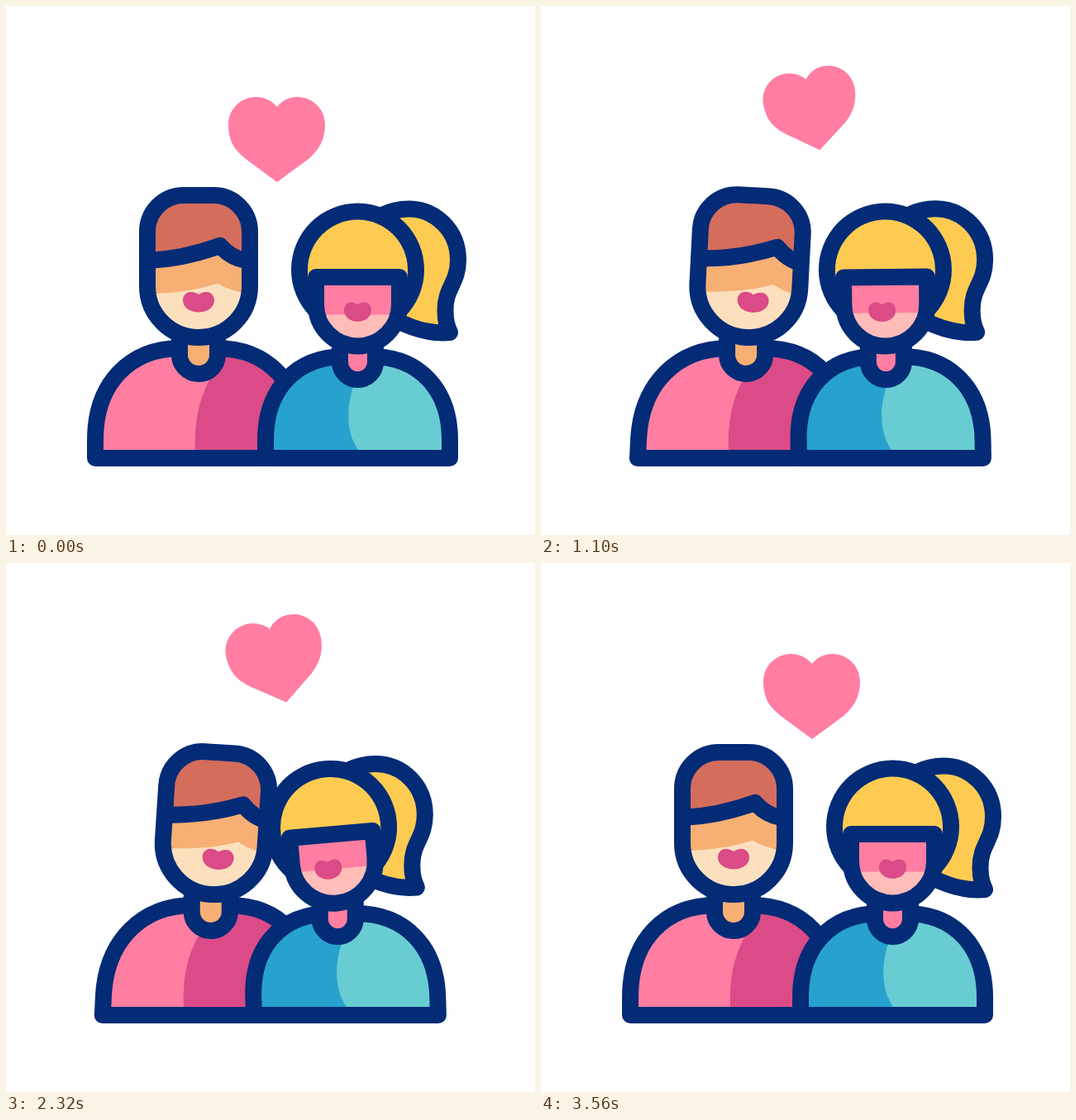
These frames come from a looping animation (640x640 px, 3600 ms). An HTML page:

```html
<!DOCTYPE html>
<html lang="en">
<head>
<meta charset="utf-8">
<title>Couple in love</title>
<style>
  html, body { margin: 0; width: 100%; height: 100%; overflow: hidden; background: #fff; }
  svg { display: block; width: 100vw; height: 100vh; }
  .line { fill: none; stroke: #032b76; stroke-width: 20; stroke-linejoin: round; stroke-linecap: round; }
  .ink { fill: #032b76; }
  .pink { fill: #ff7ea1; }
  .rose { fill: #db4b87; }
  .gold { fill: #fecb52; }
  .tan { fill: #f7af74; }
</style>
</head>
<body>
<svg viewBox="0 0 640 640">
  <defs>
    <path id="manTorso" d="M108 547V525C108 456 150 414 212 414H254C316 414 358 456 358 525V547Z"/>
    <path id="womanTorso" d="M314 547V525C314 465 350 424 410 424H441C501 424 537 465 537 525V547Z"/>
    <path id="manSkull" d="M171 273A44 44 0 0 1 215 229H251A44 44 0 0 1 295 273V339A62 62 0 0 1 171 339Z"/>
    <path id="womanFace" d="M375 328H476V361A50.5 50.5 0 0 1 375 361Z"/>
    <path id="manNeck" d="M210 402V422A23 23 0 0 0 256 422V402"/>
    <path id="womanNeck" d="M404 408V430.5A21.5 21.5 0 0 0 447 430.5V408"/>
    <path id="tail" d="M455 253Q470 245.500 487 245.500C520 245.500 547 272 547 307C547 336 531.500 340 531.500 368C531.500 382 534 388 537 395C515 397 495 392 472 380Z"/>
    <path id="lips" d="M0-9C3-11.500 7-12.500 11-12C16-11 19-7 19-2C19 7 10 12.500 0 12.500C-10 12.500-19 7-19-2C-19-7-16-11-11-12C-7-12.500-3-11.500 0-9Z"/>
    <clipPath id="manTorsoClip"><use href="#manTorso" class="manBody"/></clipPath>
    <clipPath id="womanTorsoClip"><use href="#womanTorso" class="womanBody"/></clipPath>
    <clipPath id="manSkullClip"><use href="#manSkull"/></clipPath>
    <clipPath id="womanFaceClip"><use href="#womanFace"/></clipPath>
  </defs>

  <path class="heart pink" d="M0-40C-7-48-16-52-25.500-52C-44-52-59-37-59-18.500C-59 1-52 12-38 23L0 51L38 23C51 12 58-1 58-18.500C58-37 43-52 24.500-52C15-52 6-48 0-40Z"/>

  <g clip-path="url(#manTorsoClip)">
    <path class="pink" d="M60 400H420V550H60Z"/>
    <path class="womanShade rose" d="M229 550V537C227 495 237 457 266 424L275 400H460V550Z"/>
  </g>
  <use href="#manTorso" class="manBody line"/>
  <g class="manNeckMove">
    <use href="#manNeck" class="tan"/>
    <use href="#manNeck" class="line"/>
  </g>
  <g class="manHead">
    <g clip-path="url(#manSkullClip)">
      <path fill="#fce0be" d="M165 220H300V410H165Z"/>
      <g class="manFront">
        <path class="tan" d="M140 220H320V354Q272 346 256 335.500Q225 346 181 348L140 349Z"/>
        <path fill="#d56d5d" d="M140 220H320V308H290Q272 305 259 290Q215 306 172 308H140Z"/>
        <path class="line" d="M140 309L172 308Q215 306 259 290Q272 305 290 308L310 311"/>
        <use href="#lips" class="rose" x="233" y="358"/>
      </g>
    </g>
    <use href="#manSkull" class="line"/>
  </g>

  <g class="tailMove">
    <use href="#tail" class="gold"/>
    <use href="#tail" class="line"/>
  </g>
  <g clip-path="url(#womanTorsoClip)">
    <path fill="#27a2cf" d="M250 400H620V550H250Z"/>
    <path class="womanShade" fill="#68cdd2" d="M434 550L426 537C411 515 411 485 422 455L425 400H640V550Z"/>
  </g>
  <use href="#womanTorso" class="womanBody line"/>
  <g class="womanNeckMove">
    <use href="#womanNeck" class="pink"/>
    <use href="#womanNeck" class="line"/>
  </g>
  <g class="womanHead">
    <circle class="ink" cx="425.5" cy="319" r="80.5"/>
    <path class="gold" d="M365 328V319A60.500 60.500 0 0 1 486 319V328Z"/>
    <g clip-path="url(#womanFaceClip)">
      <path class="pink" d="M370 320H480V415H370Z"/>
      <path class="womanChin" fill="#ffbcb9" d="M370 373.500H480V425H370Z"/>
    </g>
    <use href="#womanFace" class="line"/>
    <use href="#lips" class="womanLips rose"/>
  </g>
</svg>
<script>
  const LOOP = 3600, END = 3560;

  const windUp = x => x ** 2.5;
  const release = x => 1 - (1 - x) ** 2.5;
  const smooth = x => x * x * (3 - 2 * x);

  // Key poses: end time, easing towards it, [base shift, lean, head angle]
  const REST = [0, 0, 0];
  const MAN = [
    [600, windUp, [-18, 0.5, -5.3]],
    [1500, release, [13, 7, 4.2]],
    [2050, smooth, [13, 7, 4.3]],
    [3000, smooth, [-8, 1.5, 1.2]],
    [END, smooth, REST]
  ];
  const WOMAN = [
    [650, windUp, [15.5, 0, 5.8]],
    [2200, release, [-15, -10.5, -5.2]],
    [3080, smooth, [2, -3, -1]],
    [END, smooth, REST]
  ];

  function poseAt(keys, t) {
    let from = 0, pose = REST;
    for (const [to, ease, next] of keys) {
      if (t <= to) {
        const k = ease((t - from) / (to - from));
        return pose.map((v, i) => v + (next[i] - v) * k);
      }
      from = to;
      pose = next;
    }
    return pose;
  }

  const parts = {};
  function place(name, transform) {
    parts[name] = parts[name] || document.querySelectorAll("." + name);
    for (const el of parts[name]) el.setAttribute("transform", transform);
  }

  // Slide the base and lean the shoulders
  function leanBody(name, base, lean) {
    const c = -lean / 130;
    place(name, `matrix(1 0 ${c} 1 ${base - c * 547} 0)`);
  }

  // Rises and falls once while beating three times
  function drawHeart(t) {
    const u = 1 - Math.abs(2 * t / END - 1);
    const beat = 3 * u - 0.13 * Math.sin(Math.PI * u);
    const scale = 0.875 + 0.125 * Math.cos(Math.PI * beat);
    place("heart", `translate(328 ${162 - 77 * u ** 1.6}) rotate(${-16.3 * smooth(u)}) scale(${scale})`);
  }

  function drawMan(t) {
    const [base, lean, angle] = poseAt(MAN, t), neck = base + lean;
    leanBody("manBody", base, lean);
    place("manNeckMove", `translate(${neck} 0)`);
    place("manHead", `translate(${neck} 0) rotate(${angle} 233 402)`);
    place("manFront", `translate(${lean} 0)`);
  }

  function drawWoman(t) {
    const [base, lean, angle] = poseAt(WOMAN, t), neck = base + lean;
    leanBody("womanBody", base, lean * 0.35);
    place("womanShade", `translate(${base} 0)`);
    place("womanNeckMove", `translate(${neck} 0)`);
    place("womanHead", `translate(${neck} 0) rotate(${angle} 425.5 419)`);
    place("womanChin", `translate(0 ${lean * 0.35})`);
    place("womanLips", `translate(${425.5 + lean * 0.7} 370) scale(.87 .95)`);
    place("tailMove", `translate(${neck + angle * 3.2} ${angle * 0.5})`);
  }

  const start = performance.now();
  function tick() {
    const t = Math.min((performance.now() - start) % LOOP, END);
    drawHeart(t);
    drawMan(t);
    drawWoman(t);
    requestAnimationFrame(tick);
  }
  tick();
</script>
</body>
</html>
```
